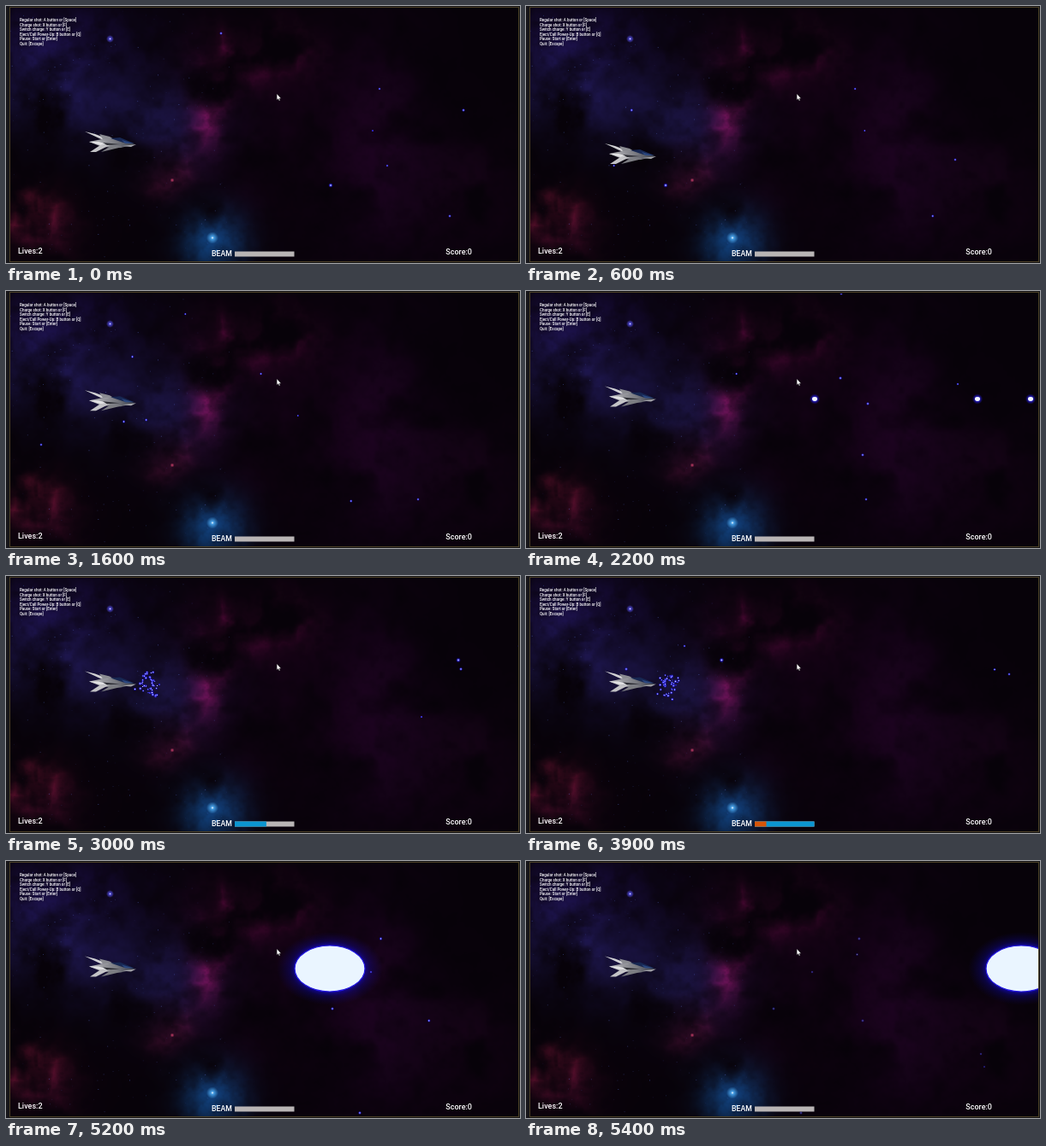
These frames come from a looping animation (600 by 301 pixels, 5500 ms). An HTML page with a canvas:

```html
<!DOCTYPE html>
<html lang="en">
<head>
<meta charset="utf-8">
<title>Space shooter</title>
<style>
html, body { margin: 0; width: 100%; height: 100%; overflow: hidden; background: #08030a; }
canvas, svg { position: absolute; left: 0; top: 0; width: 600px; height: 301px; display: block; }
text { font-family: Roboto, Arial, sans-serif; font-weight: 500; fill: #fff; }
.help { font-size: 4.5px; }
.hud { font-size: 9px; }
</style>
</head>
<body>
<canvas id="sky" width="600" height="301"></canvas>
<svg viewBox="0 0 600 301">
  <defs>
    <radialGradient id="halo">
      <stop offset="0" stop-color="#fff"/>
      <stop offset=".25" stop-color="#7f86ff"/>
      <stop offset=".5" stop-color="#2a20e0" stop-opacity=".75"/>
      <stop offset="1" stop-color="#1a10b0" stop-opacity="0"/>
    </radialGradient>
    <radialGradient id="aura">
      <stop offset=".6" stop-color="#1408d8" stop-opacity=".8"/>
      <stop offset=".75" stop-color="#1008a0" stop-opacity=".35"/>
      <stop offset="1" stop-color="#100870" stop-opacity="0"/>
    </radialGradient>
    <linearGradient id="hull">
      <stop offset="0" stop-color="#b9b9bd"/>
      <stop offset=".6" stop-color="#77787f"/>
      <stop offset="1" stop-color="#343845"/>
    </linearGradient>
    <clipPath id="view"><rect x="5" y="3" width="593" height="296"/></clipPath>
  </defs>
  <g clip-path="url(#view)">
    <g id="stars"></g>
    <g id="ship">
      <path d="M97 -1L112 -4L128 -5L151 2L134 6L112 5Z" fill="url(#hull)"/>
      <path d="M92 -13L104 -10L120 -4H111Z" fill="#d0d0d3"/>
      <path d="M109 -10L121 -7L126 -4H113Z" fill="#8b8c92"/>
      <path d="M97 -1H108L119 2L110 3Z" fill="#e1e1e3"/>
      <path d="M98 11L110 3L123 2L105 11Z" fill="#c3c3c6"/>
      <path d="M111 11L122 4L136 5Z" fill="#7c7d82"/>
      <path d="M113 0L133 2L118 3Z" fill="#2b2c33"/>
      <path d="M122 -5L133 -6L150 1L137 0Z" fill="#172752"/>
      <path d="M135 -3L149 1H139Z" fill="#2b477f"/>
      <path d="M136 4L152 2L146 5Z" fill="#a7a7ac"/>
    </g>
    <g id="charge"></g>
    <g id="shots"></g>
    <g id="blast">
      <ellipse rx="62" ry="43" fill="url(#aura)"/>
      <ellipse rx="41" ry="27" fill="#eaf5ff" stroke="#2419e4" stroke-width="1.2"/>
    </g>
  </g>
  <g id="help" class="help"></g>
  <g class="hud">
    <text x="14" y="290">Lives:2</text>
    <text x="513.3" y="291">Score:0</text>
    <text x="240" y="293.2" style="font-size:8.7px">BEAM</text>
  </g>
  <rect x="267" y="287.5" width="69.5" height="6" fill="#b9b5b5"/>
  <rect id="blue" x="267" y="287.5" height="6" fill="#0b95d0"/>
  <rect id="orange" x="267" y="287.5" height="6" fill="#d75508"/>
  <path d="M316.2 103V110L317.8 108.6L318.9 111L319.9 110.5L318.9 108.2H321Z" fill="#fff" stroke="#222" stroke-width=".3"/>
  <path d="M0 0H600V301H0Z M4 2V299.5H598.5V2Z" fill="#17161a" fill-rule="evenodd"/>
  <rect x="4.5" y="1.5" width="594" height="298" fill="none" stroke="#4b4026"/>
</svg>
<script>
const LOOP = 5500, STEP = 100;
const $ = id => document.getElementById(id);
const clamp = (v, a = 0, b = 1) => Math.min(b, Math.max(a, v));
const ease = p => p * p * (3 - 2 * p);

function random(seed) {
  return () => {
    seed = (seed + 0x6D2B79F5) | 0;
    let n = Math.imul(seed ^ seed >>> 15, 1 | seed);
    n ^= n + Math.imul(n ^ n >>> 7, 61 | n);
    return ((n ^ n >>> 14) >>> 0) / 4294967296;
  };
}

function add(parent, tag, attrs) {
  const el = document.createElementNS("http://www.w3.org/2000/svg", tag);
  set(el, attrs);
  parent.appendChild(el);
  return el;
}

function set(el, attrs) {
  for (const k in attrs) el.setAttribute(k, attrs[k]);
}

const channels = hex => [1, 3, 5].map(i => parseInt(hex.slice(i, i + 2), 16));

// Soft clouds and veined ones: x, y, rx, ry, colour
const mist = [
  [50, 95, 90, 60, "#1a1850"],
  [60, 30, 100, 45, "#0c0626"],
  [185, 140, 65, 50, "#101236"],
  [240, 275, 38, 36, "#084882"],
  [440, 170, 60, 130, "#160118"],
  [540, 220, 55, 70, "#10010f"],
  [300, 150, 110, 120, "#0d000c"]
].map(c => [...c, .25]);
const veins = [
  [232, 135, 17, 34, "#55082e"],
  [250, 92, 14, 32, "#420626"],
  [290, 55, 55, 32, "#46062a"],
  [186, 195, 25, 20, "#731642"],
  [25, 235, 32, 27, "#78142e"],
  [45, 265, 40, 30, "#2a0616"]
].map(c => [...c, .75]);

function paintSky() {
  const W = 600, H = 301, ctx = $("sky").getContext("2d");
  const img = ctx.createImageData(W, H);
  const rnd = random(11), grid = Float32Array.from({ length: 4096 }, rnd);
  const cell = (x, y) => grid[(x & 63) + (y & 63) * 64];
  const noise = (x, y) => {
    const i = Math.floor(x), j = Math.floor(y), u = ease(x - i), v = ease(y - j);
    const a = cell(i, j), b = cell(i + 1, j), c = cell(i, j + 1), d = cell(i + 1, j + 1);
    return a + (b - a) * u + (c - a) * v + (a - b - c + d) * u * v;
  };
  const clouds = [...mist, ...veins].map(([x, y, rx, ry, hex, share]) =>
    ({ x, y, rx, ry, share, rgb: channels(hex) }));
  for (let y = 0; y < H; y++) for (let x = 0; x < W; x++) {
    let fog = 0, vein = 0, amp = .5, f = 1 / 46;
    for (let o = 0; o < 5; o++) {
      const n = noise(x * f + o * 9, y * f + o * 5);
      fog += n * amp;
      vein += (1 - Math.abs(2 * n - 1)) * amp;
      amp *= .5;
      f *= 2.1;
    }
    const soft = clamp((fog - .22) * 2.1, 0, 1.4), sharp = vein ** 3 * 2.6;
    const sum = [7, 2, 9];
    for (const c of clouds) {
      const d = ((x - c.x) / c.rx) ** 2 + ((y - c.y) / c.ry) ** 2;
      if (d > 5) continue;
      const k = Math.exp(-d) * soft * (1 - c.share + sharp * c.share);
      for (let i = 0; i < 3; i++) sum[i] += c.rgb[i] * k;
    }
    img.data.set([...sum, 255], (y * W + x) * 4);
  }
  ctx.putImageData(img, 0, 0);

  for (let i = 0; i < 150; i++) {
    const x = 5 + 255 * rnd(), y = 5 + 290 * rnd();
    ctx.fillStyle = `rgba(90,115,215,${.1 + .4 * rnd() ** 2})`;
    ctx.fillRect(x, y, 1, 1);
  }
  const glow = (x, y, r, hex) => {
    const g = ctx.createRadialGradient(x, y, 0, x, y, r);
    g.addColorStop(0, "#fff");
    g.addColorStop(.25, hex + "cc");
    g.addColorStop(1, hex + "00");
    ctx.fillStyle = g;
    ctx.fillRect(x - r, y - r, 2 * r, 2 * r);
  };
  glow(121.5, 38.5, 4.5, "#5f5aff");
  glow(241, 271.5, 7, "#50b4ff");
  glow(246, 287, 2, "#4696e6");
  glow(194, 204, 2.5, "#be3c64");
}

const rnd = random(5);
const stars = [];
function addStar(x, y, t, v, r = 1.6 + rnd() * .7, end = LOOP) {
  const el = add($("stars"), "circle", { cy: y, r, fill: "url(#halo)" });
  stars.push({ x, t, v, end, el });
}

// Near stars cross quickly; each group holds places at one time
function nearStars(t, ...places) {
  for (const [x, y] of places) addStar(x, y, t, Math.max(.46, x / 780));
}
nearStars(0, [251, 32], [534, 122], [445, 187]);
nearStars(1100, [411, 77], [583, 27], [456, 151], [383, 153], [271, 180]);
nearStars(2200, [367, 102], [504, 109], [399, 132], [393, 192], [368, 3]);
nearStars(3000, [485, 165]);
nearStars(3900, [564, 115], [185, 82], [117, 109]);
nearStars(5400, [334, 130], [289, 173], [393, 187], [531, 226], [535, 241], [321, 295]);

// Slower stars stay in view longer
addStar(379, 210, 0, .36, 2.8);
addStar(436, 97, 0, .0865, 1.8, 2900);
addStar(428, 146, 0, .0545, 1.5, 1900);
addStar(518, 246, 0, .072, 2, 1900);
addStar(551, 244, 1100, .14, 1.9, 2700);
addStar(528, 98.5, 3000, .333, 2.9);
addStar(547, 109.5, 3900, .107, 1.9);
addStar(559, 91, 4700, .243, 2.2);

const MUZZLE = 150, SHOT_SPEED = 1, FILL = 69.5, RATE = .05125;
const CHARGE = 2280, RELEASE = 5010;

const shots = [1761, 1823, 2013].map(t => {
  const el = add($("shots"), "g", {});
  add(el, "circle", { r: 6.2, fill: "url(#halo)" });
  add(el, "ellipse", { rx: 3, ry: 2.4, fill: "#f3f7ff" });
  return { t, el };
});

const sparks = Array.from({ length: 48 }, () => ({
  angle: rnd() * 6.283, reach: 12 + rnd() * 11, phase: rnd(), life: 350 + rnd() * 300,
  el: add($("charge"), "circle", { r: 1.1 + rnd() * 1.3, fill: "url(#halo)" })
}));

["Regular shot: A button or [Space]", "Charge shot: X button or [F]",
 "Switch charge: Y button or [E]", "Eject/Call Power-Up: B button or [Q]",
 "Pause: Start or [Enter]", "Quit: [Escape]"
].forEach((line, i) => {
  add($("help"), "text", { x: 16, y: 18 + i * 5.55 }).textContent = line;
});

function shipY(t) {
  return 160 + 19 * ease(clamp(t / 900)) - 54.5 * ease(clamp((t - 1150) / 550));
}

function draw(t) {
  for (const s of stars) {
    const x = s.x - (t - s.t) * s.v;
    set(s.el, { cx: x, opacity: x < 602 ? clamp((s.end - t) / 200) : 0 });
  }
  set($("ship"), { transform: `translate(0 ${shipY(t)})` });
  for (const s of shots) {
    const x = MUZZLE + (t - s.t) * SHOT_SPEED;
    set(s.el, { transform: `translate(${x} 126.5)`, opacity: t >= s.t && x < 610 ? 1 : 0 });
  }

  const charging = t >= CHARGE && t < RELEASE;
  const fill = charging ? (t - CHARGE) * RATE : 0;
  set($("blue"), { width: clamp(fill, 0, FILL) });
  set($("orange"), { width: clamp(fill - FILL, 0, FILL) });
  set($("charge"), { opacity: charging ? 1 : 0 });
  for (const s of sparks) {
    const age = t / s.life + s.phase, p = age % 1, turn = Math.floor(age) * 2.4;
    const r = s.reach * (1 - .75 * p);
    set(s.el, {
      cx: 167 + r * .85 * Math.cos(s.angle + turn),
      cy: 126 + r * Math.sin(s.angle + turn)
    });
  }
  set($("blast"), {
    transform: `translate(${188 + (t - RELEASE) * SHOT_SPEED} 126)`,
    opacity: t >= RELEASE ? 1 : 0
  });
}

paintSky();
const start = performance.now();
function tick() {
  const t = Math.max(0, performance.now() - start) % LOOP;
  draw(Math.floor(t / STEP) * STEP);
  requestAnimationFrame(tick);
}
tick();
</script>
</body>
</html>
```
